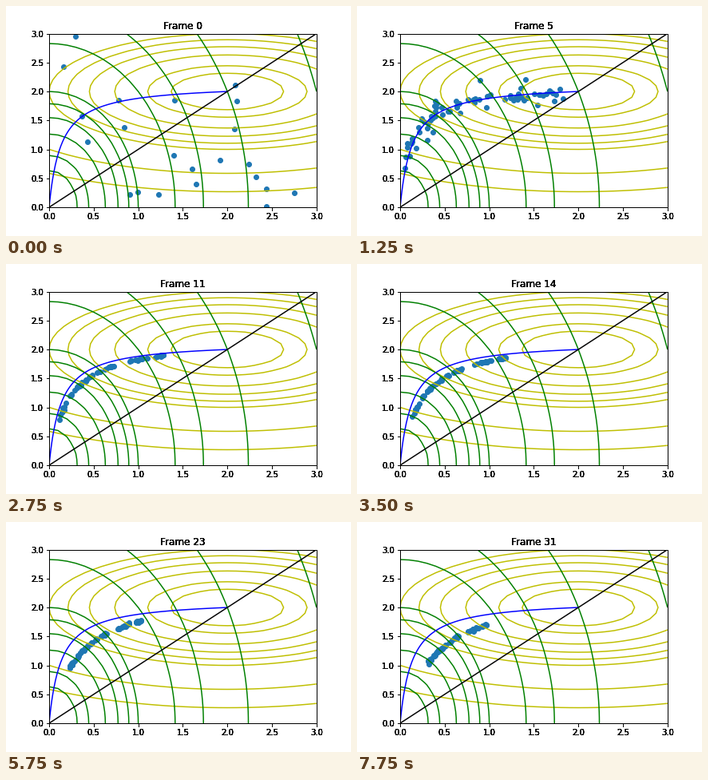
Write a matplotlib script that moves like this. It is 432 by 288 pixels and loops after 8000 ms.

```python
import numpy as np
import matplotlib.pyplot as plt
from matplotlib.animation import FuncAnimation

FRAMES, STEP_MS = 32, 250
LEVELS = [0.1, 0.2, 0.4, 0.6, 0.8, 1, 2, 3, 5, 10]
LIM = 3
LABEL_LAYERS = 6

# Each member keeps its place along the curve; a gap splits two groups.
place = np.random.default_rng(4)
ALONG = place.permutation(np.concatenate([
    place.uniform(0, 0.64, 46),
    place.uniform(0.74, 1, 26),
]))


def saturate(x, top, half):
    return top * x / (x + half)


def population(gen):
    """Random at first, then drawn to a curve that shortens and flattens."""
    rng = np.random.default_rng(gen + 20)
    if gen == 0:
        return rng.uniform(0, LIM, (22, 2))
    along = ALONG[:30 + 15 * gen]
    low = max(0.02, 0.05 + 0.0102 * (gen - 7))
    high = min(1.75, 0.8 + 5.5 / gen)
    x = low + (high - low) * along**1.4
    y = saturate(x, 2.05 + 0.0122 * gen, 0.08 + 0.0107 * gen)
    spread = max(0.006, 0.17 * np.exp(-0.47 * (gen - 3)))
    noise = spread * rng.standard_t(5, (2, len(x)))
    return np.abs(np.column_stack([x + 0.7 * noise[0], y + noise[1]]))


fig, ax = plt.subplots(figsize=(6, 4), dpi=72)
fig.subplots_adjust(left=0.125, right=0.9, bottom=0.125, top=0.88)

x, y = np.meshgrid(np.linspace(0, LIM, 31), np.linspace(0, LIM, 31))
ax.contour(x, y, (x - 2)**2 / 4 + (y - 2)**2, LEVELS, colors="y")
ax.contour(x, y, x**2 + y**2 / 4, LEVELS, colors="g")
front = np.linspace(0, 2, 200)
ax.plot(front, saturate(front, 32 / 15, 2 / 15), "b")
ax.plot([0, LIM], [0, LIM], "k")
dots = ax.scatter([], [], color="C0")

# Repeated labels give the text its heavy edges.
box = ax.get_position()
layers = [ax] + [fig.add_axes(box, facecolor="none") for _ in range(LABEL_LAYERS - 1)]
for layer in layers:
    layer.set(xlim=(0, LIM), ylim=(0, LIM))
    layer.set_xticks(np.arange(0, 3.1, 0.5))
    layer.set_yticks(np.arange(0, 3.1, 0.5))


def draw(gen):
    dots.set_offsets(population(gen))
    for layer in layers:
        layer.set_title(f"Frame {gen}")


anim = FuncAnimation(fig, draw, frames=FRAMES, init_func=lambda: None,
                     interval=STEP_MS, repeat=True, repeat_delay=0)
plt.show()
```
